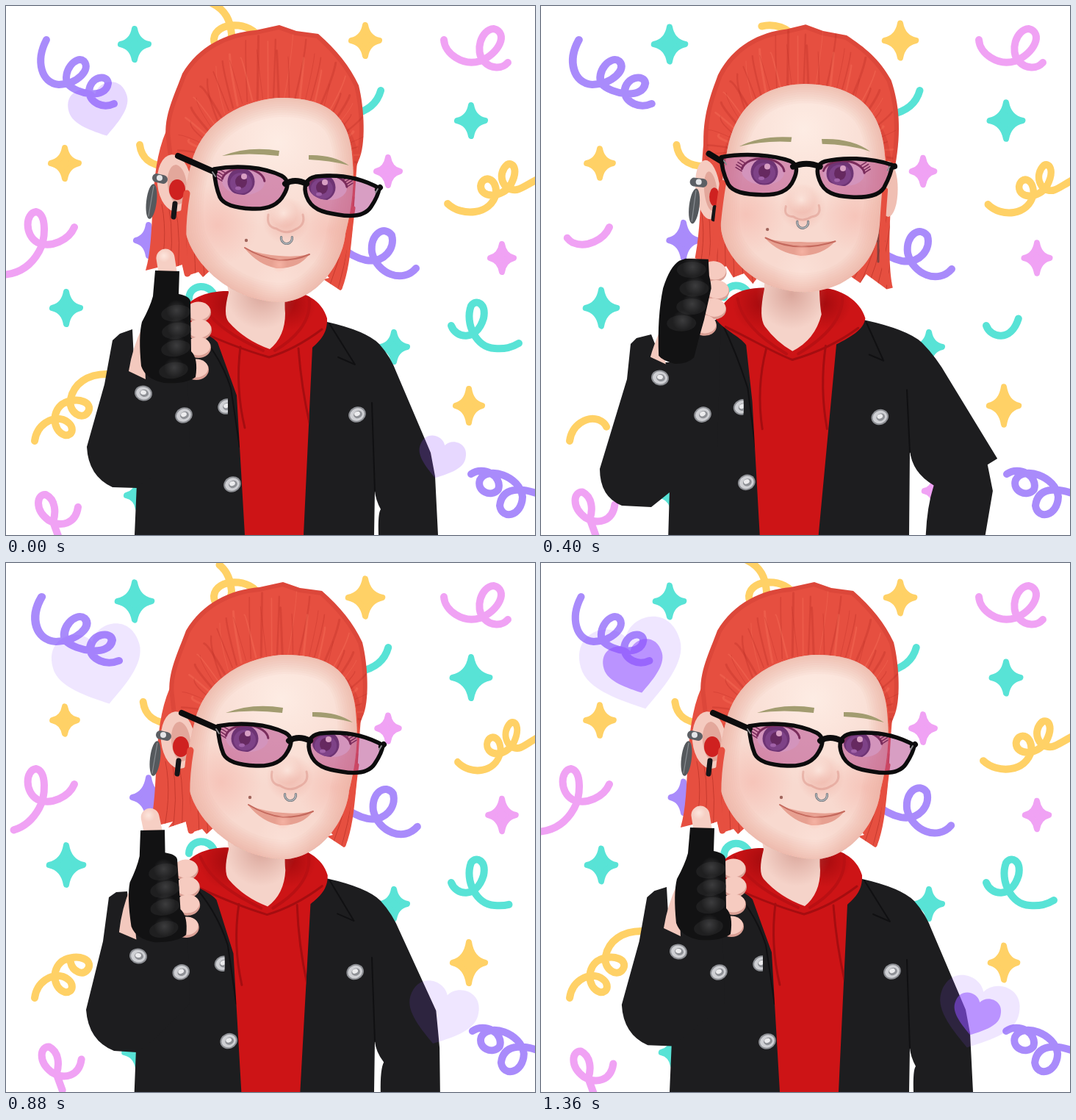
An HTML page with a canvas that plays this animation: 720x720 px, repeating every 1.44 s.

```html
<!DOCTYPE html>
<html>
<head>
<meta charset="utf-8">
<style>
html, body { margin: 0; width: 100%; height: 100%; overflow: hidden; background: #fff; }
canvas { display: block; width: 720px; height: 720px; }
</style>
</head>
<body>
<canvas id="stage" width="720" height="720"></canvas>
<script>
const ctx = document.getElementById('stage').getContext('2d');
const STEP = 80, STEPS = 18, NUMBER = /-?[\d.]+/g;
const PURPLE = '#a98bfb', PINK = '#f0a2f4', TEAL = '#58e3d6', YELLOW = '#ffd166';
const HAIR = '#e64f40', HAIR_DARK = '#c63a2e', SKIN = '#f8d9cf', JACKET = '#1d1d1f', SEAM = '#101012';
const RED = '#cd1416', RED_DARK = '#a50d10';

const lerp = (a, b, k) => a + (b - a) * k;

// Blend two paths of equal structure.
function morph(a, b, k) {
  const to = b.match(NUMBER);
  let i = 0;
  return new Path2D(a.replace(NUMBER, v => lerp(+v, +to[i++], k).toFixed(2)));
}

// Keys are [step, value]; returns both neighbours and the blend between them.
function span(keys, n) {
  let i = 0;
  while (i < keys.length - 2 && n >= keys[i + 1][0]) i++;
  const [a, b] = [keys[i], keys[i + 1]];
  return [a[1], b[1], Math.min(1, Math.max(0, (n - a[0]) / (b[0] - a[0])))];
}
const track = (keys, n) => lerp(...span(keys, n));
const trackAll = (keys, n) => {
  const [a, b, k] = span(keys, n);
  return a.map((v, i) => lerp(v, b[i], k));
};

function fill(path, color) { ctx.fillStyle = color; ctx.fill(path); }
function stroke(path, color, width) {
  ctx.strokeStyle = color;
  ctx.lineWidth = width;
  ctx.stroke(path);
}
function oval(x, y, rx, ry, color, turn = 0) {
  ctx.beginPath();
  ctx.ellipse(x, y, rx, ry, turn, 0, 7);
  ctx.fillStyle = color;
  ctx.fill();
}
function glow(x, y, r, rgb, alpha) {
  const g = ctx.createRadialGradient(x, y, 0, x, y, r);
  g.addColorStop(0, `rgba(${rgb},${alpha})`);
  g.addColorStop(1, `rgba(${rgb},0)`);
  oval(x, y, r, r, g);
}
function button(x, y, turn = 0) {
  oval(x, y, 12, 10.5, '#8d8f94', turn);
  oval(x, y, 10, 8.5, '#cfd0d4', turn);
  oval(x + 1, y, 6, 5, '#8f9196', turn);
  oval(x, y - 1, 4, 3, '#ececee', turn);
}

// ---- Background ----

// [path, color, shift x, shift y, stretch x, stretch origin]; the shifts and the stretch follow the pulse
const curls = [
  ['M55 46C40 75 48 105 72 107C98 106 116 86 106 75C95 66 76 90 84 106C96 120 136 128 139 105C138 92 114 96 113 116C114 132 132 140 147 133', PURPLE, 0, 0, .15, 101],
  ['M596 46C597 65 622 82 645 75C672 65 684 36 664 31C646 32 638 62 650 75C660 86 675 86 683 77', PINK, 0, 0, 0, 0],
  ['M601 269C620 287 660 285 667 255C668 232 648 230 646 245C646 262 675 262 687 243C698 222 690 212 682 216C668 228 675 252 695 250C705 248 712 240 740 228', YELLOW, 0, 2, -.12, 722],
  ['M633 637C650 625 676 640 670 658C660 670 640 660 645 645C655 625 700 640 703 668C702 695 675 700 672 680C675 655 700 655 724 664', PURPLE, 2, 0, 0, 0],
  ['M558 357C540 378 505 365 498 335C495 310 515 298 525 312C530 330 515 350 490 346C475 343 465 335 450 325', PURPLE, 2, 2, 0, 0],
  ['M510 115C506 130 495 143 470 148', TEAL, 11, 0, 0, 0],
  ['M182 189C184 205 195 218 220 218', YELLOW, 5, 0, 0, 0],
  ['M98 682C95 705 75 710 58 700C38 685 42 664 54 665C68 672 68 690 64 702L72 724', PINK, 5, -7, 0, 0],
  ['M207 423C213 434 222 440 235 440M249 398C250 378 278 376 284 396', TEAL, 0, -3, 0, 0]
].map(([d, ...rest]) => [new Path2D(d), ...rest]);

// [path, color, drawing speed]
const drawn = [
  ['M93 301C86 318 62 330 43 322C25 312 26 282 41 280C56 284 54 318 45 334C35 352 20 365 -6 366', PINK, 1],
  ['M606 435C612 452 640 458 650 425C654 405 640 398 633 408C624 432 640 465 665 466C680 467 688 465 698 459', TEAL, 1],
  ['M39 592C42 570 62 558 78 563C95 570 92 586 80 584C62 578 62 548 80 540C100 532 118 540 112 552C104 566 84 552 88 535C92 515 110 500 140 501', YELLOW, .8],
  ['M345 45C335 20 285 20 283 45C283 65 307 60 307 38C305 20 300 6 280 -4', YELLOW, 1]
].map(([d, color, speed]) => {
  const el = document.createElementNS('http://www.w3.org/2000/svg', 'path');
  el.setAttribute('d', d);
  return { path: new Path2D(d), color, speed, length: el.getTotalLength() };
});

// [x, y, half width, half height, growth, color]
const stars = [
  [175, 52, 23, 25, .2, TEAL], [633, 156, 23, 25, .3, TEAL], [82, 411, 23, 26, .2, TEAL],
  [528, 464, 22, 24, 0, TEAL], [180, 666, 20, 22, .15, TEAL], [489, 47, 23, 25, .2, YELLOW],
  [80, 214, 23, 25, -.1, YELLOW], [630, 544, 22, 27, .2, YELLOW], [520, 225, 20, 23, -.07, PINK],
  [675, 343, 20, 23, .15, PINK], [536, 660, 17, 19, .15, PINK], [194, 319, 21, 25, .25, PURPLE]
];

function star(x, y, w, h, color) {
  const c = .16;
  w -= 4; h -= 4;
  ctx.beginPath();
  ctx.moveTo(x, y - h);
  for (const [sx, sy, ex, ey] of [[1, -1, 1, 0], [1, 1, 0, 1], [-1, 1, -1, 0], [-1, -1, 0, -1]])
    ctx.quadraticCurveTo(x + sx * c * w, y + sy * c * h, x + ex * w, y + ey * h);
  ctx.closePath();
  ctx.fillStyle = ctx.strokeStyle = color;
  ctx.lineWidth = 8;
  ctx.fill();
  ctx.stroke();
}

function background(n) {
  const pulse = (1 - Math.cos((n - .5) / STEPS * 2 * Math.PI)) / 2;
  for (const [x, y, w, h, grow, color] of stars) {
    const s = 1 + grow * pulse;
    star(x, y, w * s, h * s, color);
  }
  for (const [path, color, dx, dy, stretch, origin] of curls) {
    ctx.save();
    ctx.translate(origin + dx * pulse, dy * pulse);
    ctx.scale(1 + stretch * pulse, 1);
    ctx.translate(-origin, 0);
    stroke(path, color, 10);
    ctx.restore();
  }
  const shown = (n - 2.2) / 9.5;
  if (shown <= 0) return;
  for (const { path, color, speed, length } of drawn) {
    ctx.setLineDash([length * Math.min(1, shown * speed), 999]);
    stroke(path, color, 10);
  }
  ctx.setLineDash([]);
}

// ---- Body ----

const turnKeys = [[1, 0], [3, 0], [5, .3], [8, 1], [18, 1]];
const bodyKeys = [[1, 0], [3, 0], [5, .12], [8, .5], [11, .85], [15, 1], [18, 1]];

const armKeys = [
  [1, 'M85 610L88 660L68 690Q70 730 100 740L150 742L175 680L240 620L245 428L205 433L165 560L150 640L120 600L98 600Z'],
  [3, 'M102 535L98 585L72 655Q68 700 100 718L150 722L175 640L240 600L245 428L205 433L185 530L165 575L135 515L112 520Z'],
  [5, 'M122 460L117 508L80 630Q80 668 110 680L150 682L175 662L240 600L245 428L215 440L200 485L165 485L150 447L130 452Z'],
  [8, 'M128 428L122 480L96 600Q94 635 130 657L165 657L177 640L240 600L245 428L210 430L205 460L170 460L150 418L135 422Z'],
  [11, 'M140 455L132 515L109 608Q112 650 147 664L178 666L200 650L250 600L245 428L210 437L200 500L170 500L165 447L150 448Z'],
  [18, 'M145 455L134 515L110 600Q112 640 145 655L178 656L200 640L250 600L245 428L205 440L205 500L175 500L172 440L155 446Z']
];
const cuffKeys = [[1, [118, 668]], [3, [136, 599]], [5, [162, 506]], [8, [168, 480]], [11, [180, 535]], [15, [185, 538]], [17, [187, 529]], [18, [187, 527]]];

function body(n) {
  const k = track(bodyKeys, n);
  const shape = (a, b) => morph(a, b, k);
  const jacket = shape(
    'M205 435L242 426L440 427Q500 440 520 458Q540 478 556 505L627 617L611 622L619 660L607 720L526 720Q528 680 538 648Q505 630 502 597L501 720L173 720L176 610Z',
    'M190 440L240 428L437 430Q490 442 508 460Q524 478 532 500L578 608L584 640L585 660L588 720L507 720Q506 690 510 685Q503 672 502 660L501 720L175 720L178 650Z');
  fill(jacket, JACKET);
  fill(morph(...span(armKeys, n)), JACKET);
  stroke(shape('M443 430L465 482L446 474M502 600L498 520M246 432Q262 470 278 520L288 600', 'M440 432L475 488L452 478M502 660L498 540M250 432Q290 470 306 520L318 600'), SEAM, 2);

  const hoodie = shape(
    'M303 383C270 383 250 395 238 425C245 440 270 450 278 462L284 540L294 720L374 720L400 460C420 450 440 440 442 425C435 400 405 382 376 383Z',
    'M296 388C265 390 245 400 232 428C262 440 282 450 288 458L314 530L325 720L405 720L417 465C428 455 438 445 437 425C430 400 405 388 382 388Z');
  fill(hoodie, RED);
  ctx.save();
  ctx.clip(hoodie);
  glow(L2(300, 302, k), 405, 40, '120,0,5', .45);
  glow(L2(386, 386, k), 405, 36, '120,0,5', .45);
  stroke(shape('M252 437C290 455 318 474 340 482C375 472 405 458 432 438', 'M245 434C295 458 330 470 358 478C385 470 410 455 430 440'), RED_DARK, 3);
  stroke(shape('M268 398C272 430 300 455 332 474M410 396C410 430 380 455 348 474', 'M264 400C280 435 320 455 350 469M412 396C418 430 390 455 366 469'), '#b91013', 4);
  stroke(shape('M305 466Q290 520 298 576M386 462Q376 520 386 576', 'M319 464Q312 520 325 574M398 466Q402 520 414 572'), RED_DARK, 3);
  ctx.restore();

  fill(shape('M306 350L304 385Q296 425 305 437Q320 458 340 470Q372 455 382 420Q378 400 378 350Z', 'M296 350L303 390Q295 420 303 430Q325 455 359 467Q380 450 380 418Q378 400 384 350Z'), '#f5d3c9');
  glow(L2(340, 348, k), 392, 48, '196,130,118', .55);
}
function L2(a, b, k) { return lerp(a, b, k); }

function buttons(n) {
  const k = track(bodyKeys, n);
  const place = (x1, y1, x2, y2) => button(lerp(x1, x2, k), lerp(y1, y2, k), -.4);
  ctx.save();
  ctx.beginPath();
  ctx.rect(0, 0, lerp(272, 302, k), 720);
  ctx.clip();
  place(270, 546, 300, 545);
  ctx.restore();
  place(217, 556, 242, 557);
  place(276, 648, 308, 651);
  place(459, 560, 478, 556);
  button(...trackAll(cuffKeys, n), .2);
}

// ---- Hand: [shift x, shift y, rotation, pose, thumb] ----

const handKeys = [
  [1, [-25, 205, .3, 0, 1]], [3, [-10, 125, .17, 0, 1]], [5, [9, 28, .13, 0, 0]],
  [8, [0, 0, 0, 0, .3]], [10, [-18, 0, -.05, .9, 1]], [11, [-16, 3, -.05, 1, 1]],
  [15, [-2, 9, 0, 1, 1]], [17, [0, 0, 0, 1, 1]], [18, [0, 0, 0, 1, 1]]
];
// [x, y] of each finger closed, then with the thumb up
const fingers = [[221, 328, 264, 416], [228, 353, 265, 440], [227, 378, 264, 464], [217, 402, 261, 494]];

function hand(n) {
  const [dx, dy, turn, k, thumb] = trackAll(handKeys, n);
  const cx = lerp(185, 220, k), cy = lerp(390, 440, k);
  ctx.save();
  ctx.translate(cx + dx, cy + dy);
  ctx.rotate(turn);
  ctx.translate(-cx, -cy);

  fill(morph('M157 415Q150 440 148 455L170 462Z', 'M186 436Q172 465 167 497L190 508Z', k), '#f3c9be');
  const baseX = lerp(188, 221, k), baseY = lerp(326, 368, k);
  const tipX = lerp(186, 217, k), tipY = lerp(305, 343, k);
  const digit = new Path2D();
  digit.moveTo(baseX, baseY);
  digit.lineTo(lerp(baseX, tipX, thumb), lerp(baseY, tipY, thumb));
  stroke(digit, '#f6cfc4', 25);
  glow(lerp(baseX, tipX, thumb) - 2, lerp(baseY, tipY, thumb) - 3, 9, '255,236,228', .8);

  const spots = fingers.map(([ax, ay, bx, by]) => [lerp(ax, bx, k), lerp(ay, by, k)]);
  for (const [x, y] of spots) {
    oval(x - 2, y + 1, 17, 14, '#d99f94');
    oval(x - 2, y - 1, 16, 12.5, '#f6cbc0');
  }
  const glove = morph(
    'M178 316L209 313L213 335Q217 345 218 352L214 395Q210 420 207 448Q200 458 182 460Q165 458 159 452Q150 400 153 360Q158 330 170 320Z',
    'M203 360L236 361L235 392Q250 395 251 402L252 470Q262 480 258 505Q245 515 215 513Q190 508 184 490Q180 450 185 430Q196 410 200 395Z', k);
  fill(glove, '#121213');
  ctx.clip(glove);
  for (const [x, y] of spots) {
    oval(x - 33, y + 2, 20, 11, '#1f1f20', -.15);
    glow(x - 32, y - 2, 14, '90,90,92', .5);
  }
  ctx.restore();
}

// ---- Head ----

const swayKeys = [[1, 0], [3, 0], [5, 5], [8, 5], [11, 5], [15, 3], [17, 0], [18, 0]];
const nodKeys = [[1, 0], [3, 0], [5, -3], [8, -9], [11, 0], [15, 2], [17, 0], [18, 0]];
const openKeys = [[1, 1], [13, 1], [14, .45], [15, .3], [16, .65], [17, 1], [18, 1]];

function eye(x, y, rx, ry, iris, side, open) {
  y += (1 - open) * 10;
  const lid = ry * open, start = Math.PI * 1.04, end = Math.PI * 1.96;
  ctx.save();
  ctx.beginPath();
  ctx.ellipse(x, y, rx, lid, .05, 0, 7);
  ctx.fillStyle = '#f6ecf2';
  ctx.fill();
  ctx.clip();
  oval(iris, y, 18.5, 18.5, '#2b2a60');
  oval(iris, y + 2, 15, 14, '#4a4688');
  oval(iris, y, 8, 9, '#1a1438');
  oval(iris + 4, y - 7, 4, 4, '#fff');
  oval(iris - 4, y + 9, 4, 2.5, '#8f86c8');
  ctx.restore();
  ctx.beginPath();
  ctx.ellipse(x, y, rx, lid, .05, start, end);
  ctx.strokeStyle = '#431a30';
  ctx.lineWidth = 3;
  ctx.stroke();
  ctx.lineWidth = 1.6;
  ctx.beginPath();
  for (let i = 0; i < 4; i++) {
    const a = .05 + i * .2, lx = x + side * Math.cos(a) * rx, ly = y - Math.sin(a) * lid;
    ctx.moveTo(lx, ly);
    ctx.lineTo(lx + side * 8, ly - 5 * open + 3 * (1 - open));
  }
  ctx.stroke();
}

function head(n) {
  const k = track(turnKeys, n), nod = track(nodKeys, n), open = track(openKeys, n);
  const L = (a, b) => lerp(a, b, k);
  const shape = (a, b) => morph(a, b, k);
  ctx.save();
  ctx.translate(track(swayKeys, n), 0);

  // The face covers the lower part of the hair cap
  const cap = shape(
    'M216 200C214 150 225 120 234 95C255 52 290 36 325 31L348 25L372 34L405 41C430 55 450 68 468 98C480 130 484 160 476 220L462 250C466 200 455 155 430 152C400 150 300 150 272 152C245 165 240 200 238 270L222 260Z',
    'M218 180C214 150 230 120 240 92C262 55 300 36 340 33L372 26L395 34L425 38C450 60 468 82 480 108C488 140 490 190 480 210L474 225C474 190 468 180 455 162C430 162 360 162 300 168C268 180 262 200 244 260L222 215Z');
  fill(cap, HAIR);
  ctx.save();
  ctx.clip(cap);
  const cx = L(345, 362), cy = L(195, 205);
  for (let i = 0; i < 44; i++) {
    const a = Math.PI * (.97 + i / 41), wave = Math.sin(i * 2.7);
    const line = new Path2D();
    line.moveTo(cx + Math.cos(a) * 95, cy + Math.sin(a) * 80);
    line.quadraticCurveTo(cx + Math.cos(a + .06 * wave) * 120, cy + Math.sin(a) * 140,
      cx + Math.cos(a) * 122 + wave * 8, cy + Math.sin(a) * (155 + 15 * wave));
    stroke(line, i % 3 ? 'rgba(180,40,32,.28)' : 'rgba(255,130,105,.25)', 1 + (i % 4) * .7);
  }
  stroke(cap, 'rgba(160,30,25,.15)', 12);
  ctx.restore();

  // Ears and jewellery
  const earX = L(219, 229), earY = L(254, 241);
  oval(L(473, 455), 249, 13, 38, '#f0bfb3');
  oval(earX, earY, L(14, 23), L(41, 39), '#f5cbc0', -.1);
  oval(earX + 4, earY + 2, L(7, 13), 27, '#e3a79b', -.1);
  oval(L(230, 233), L(264, 250), L(5, 11), L(12, 14), '#cf2120');
  oval(L(466, 450), 264, 4, 12, '#cf2120');
  stroke(shape('M233 277L231 291', 'M230 269L228 287'), '#151518', 7);
  stroke(shape('M203 242L216 243', 'M205 234L214 236'), '#5c5f64', 12);
  oval(L(210, 209), L(242, 234), 4, 4, '#e4e5e8');
  oval(L(206, 198), L(275, 266), 7, 24, '#55595d', .12);
  stroke(shape('M208 254L203 296', 'M201 245L194 286'), '#8a8e93', 1.2);
  ctx.globalAlpha = Math.max(0, 1 - k * 1.5);
  stroke(new Path2D('M455 278L454 296'), '#151518', 9);
  stroke(new Path2D('M454 300V348M447 320H462'), '#39383c', 3);
  ctx.globalAlpha = 1;

  ctx.translate(0, nod);
  const face = shape(
    'M345 102C270 104 248 150 244 215C240 240 235 270 238 305C240 340 275 386 345 388C415 386 450 345 453 300C458 270 462 240 460 210C456 150 430 104 345 102Z',
    'M370 125C310 130 264 165 252 215C242 250 240 280 245 310C255 350 305 404 378 403C425 398 458 350 462 310C472 270 474 240 472 215C470 150 440 124 370 125Z');
  fill(face, SKIN);
  ctx.save();
  ctx.clip(face);
  glow(L(345, 370), L(165, 185), 120, '255,241,233', .8);
  for (let w = 4; w <= 52; w += 6) stroke(face, 'rgba(215,140,125,.05)', w);
  glow(L(268, 288), L(282, 298), 55, '242,158,146', .36);
  glow(L(415, 440), L(282, 305), 50, '242,158,146', .34);
  glow(L(340, 372), L(358, 378), 38, '255,234,226', .4);
  ctx.restore();

  // Locks beside the face
  stroke(shape('M241 240C230 300 234 330 217 348', 'M246 255C240 290 238 330 247 364'), HAIR, 9);
  stroke(shape('M459 245C456 300 450 340 474 378', 'M473 275C467 310 468 350 455 384'), HAIR, L(9, 5));

  // Nose and mouth
  glow(L(338, 381), L(270, 292), 32, '232,150,136', .5);
  glow(L(337, 378), L(260, 282), 18, '255,240,232', .7);
  stroke(shape('M316 272Q312 285 326 284Q338 292 350 284Q364 284 360 270', 'M357 284Q354 301 368 303Q382 312 394 304Q408 298 404 284'), 'rgba(205,125,112,.35)', 3);
  const ring = new Path2D();
  ring.arc(L(338, 382), L(290, 316), 7.5, -.2, Math.PI + .2);
  stroke(ring, '#74777c', 3.2);
  stroke(ring, '#b9bdc2', 1.3);
  fill(shape('M290 315Q318 319 338 317Q360 318 388 317Q370 336 340 337Q308 334 290 315Z', 'M325 330Q350 339 372 340Q394 342 413 338Q398 358 368 357Q343 352 325 330Z'), '#e7a091');
  stroke(shape('M290 314Q315 325 340 324Q365 324 388 317', 'M325 329Q348 343 372 346Q395 346 413 338'), '#c4695d', 2);
  glow(L(341, 372), L(331, 352), 11, '255,190,175', .6);
  oval(L(293, 327), L(302, 319), 2.2, 2.2, '#a0655c');

  // Brows and eyes
  ctx.save();
  ctx.translate(0, (1 - open) * 18);
  fill(shape('M252 190Q280 174 321 175L320 181Q285 180 252 190Z', 'M294 204Q330 190 372 197L371 204Q330 199 294 204Z'), '#a29c70');
  fill(shape('M362 176Q405 174 433 194Q400 183 363 183Z', 'M412 203Q445 202 467 217Q440 210 412 209Z'), '#a29c70');
  ctx.restore();
  eye(L(286, 323), L(224, 239), 29, 18, L(290, 320), -1, open);
  eye(L(394, 438), L(224, 247), L(29, 26), 17, L(390, 430), 1, open);

  // Glasses
  const lenses = [
    shape('M222 203C255 197 295 200 317 207C328 211 326 222 322 232C316 249 300 253 280 253C255 253 238 250 232 239C226 227 222 214 222 203Z',
      'M283 222C315 216 350 219 375 231C386 237 384 247 378 257C370 272 355 277 335 276C310 275 296 270 291 260C286 248 284 234 283 222Z'),
    shape('M458 207C425 199 385 200 364 207C353 211 355 222 359 232C365 249 380 254 402 254C425 254 440 251 447 240C453 228 457 216 458 207Z',
      'M508 248C480 232 450 229 422 232C406 235 405 247 409 259C415 276 430 281 452 284C475 288 490 284 497 273C503 264 507 256 508 248Z')
  ];
  for (const lens of lenses) {
    fill(lens, 'rgba(178,62,136,.5)');
    stroke(lens, '#0c0c0d', 5.5);
  }
  stroke(shape('M320 213Q340 205 360 213', 'M380 242Q393 234 409 242'), '#0c0c0d', 8);
  stroke(shape('M223 210L219 204M458 210L462 210', 'M284 226L234 204M506 250L509 247'), '#0c0c0d', 8);
  stroke(shape('M228 208L231 213M454 210L451 215', 'M281 226L285 232M506 249L503 254'), '#8a8a8e', 2);
  ctx.restore();
}

function backHair(n) {
  ctx.save();
  ctx.translate(track(swayKeys, n), 0);
  const locks = morph(
    'M222 150C214 220 225 290 203 370L222 360L216 372L250 355L262 370L275 365L290 382L310 350L380 350L395 378L412 372L425 380L440 362L470 385L481 383C455 340 480 220 470 150Z',
    'M218 170C192 230 205 310 190 360L222 352L216 360L240 352L244 368L262 362L268 369L300 340L380 345L420 350L432 362L440 370L432 372L455 387L457 385C480 300 470 240 486 150Z',
    track(turnKeys, n));
  fill(locks, HAIR);
  ctx.clip(locks);
  for (let i = 0; i < 7; i++)
    stroke(new Path2D(`M${212 + i * 9} 270Q${222 + i * 9} 320 ${206 + i * 13} 380M${450 + i * 6} 260Q${446 + i * 6} 320 ${400 + i * 13} 385`), HAIR_DARK, 1);
  ctx.restore();
}

// ---- Hearts: [width, opacity] per layer ----

const heartShape = new Path2D('M0 -.28C-.1 -.5 -.5 -.5 -.5 -.1C-.5 .15 -.2 .35 0 .5C.2 .35 .5 .15 .5 -.1C.5 -.5 .1 -.5 0 -.28Z');
const heartLayers = [
  [[8, [40, 0]], [11, [122, .14]], [14, [238, .22]], [15, [238, .22]], [17, [140, .14]], [18, [100, 0]]],
  [[11, [50, 0]], [13, [110, .4]], [15, [135, .4]], [17, [82, .55]], [18, [82, .22]]],
  [[12, [30, 0]], [14, [68, .85]], [15, [72, .88]], [17, [45, 0]], [18, [45, 0]]]
];

function heart(x, y, width, tilt, alpha) {
  ctx.save();
  ctx.translate(x, y);
  ctx.rotate(tilt);
  ctx.scale(width, width * .92);
  fill(heartShape, `rgba(145,80,255,${alpha})`);
  ctx.restore();
}

function hearts(n) {
  for (const keys of heartLayers) {
    const [w, alpha] = trackAll(keys, n);
    if (alpha <= 0) continue;
    heart(130 - w * .035, 146 - w * .07, w, -.27, alpha);
    heart(590 + w * .03, 618 - w * .05, w * .785, .29, alpha);
  }
}

function frame(now) {
  const n = Math.floor(now / STEP) % STEPS || STEPS;
  ctx.lineCap = ctx.lineJoin = 'round';
  ctx.fillStyle = '#fff';
  ctx.fillRect(0, 0, 720, 720);
  background(n);
  backHair(n);
  body(n);
  head(n);
  buttons(n);
  hand(n);
  hearts(n);
}

const begin = performance.now();
function loop() {
  frame(performance.now() - begin);
  requestAnimationFrame(loop);
}
loop();
</script>
</body>
</html>
```
